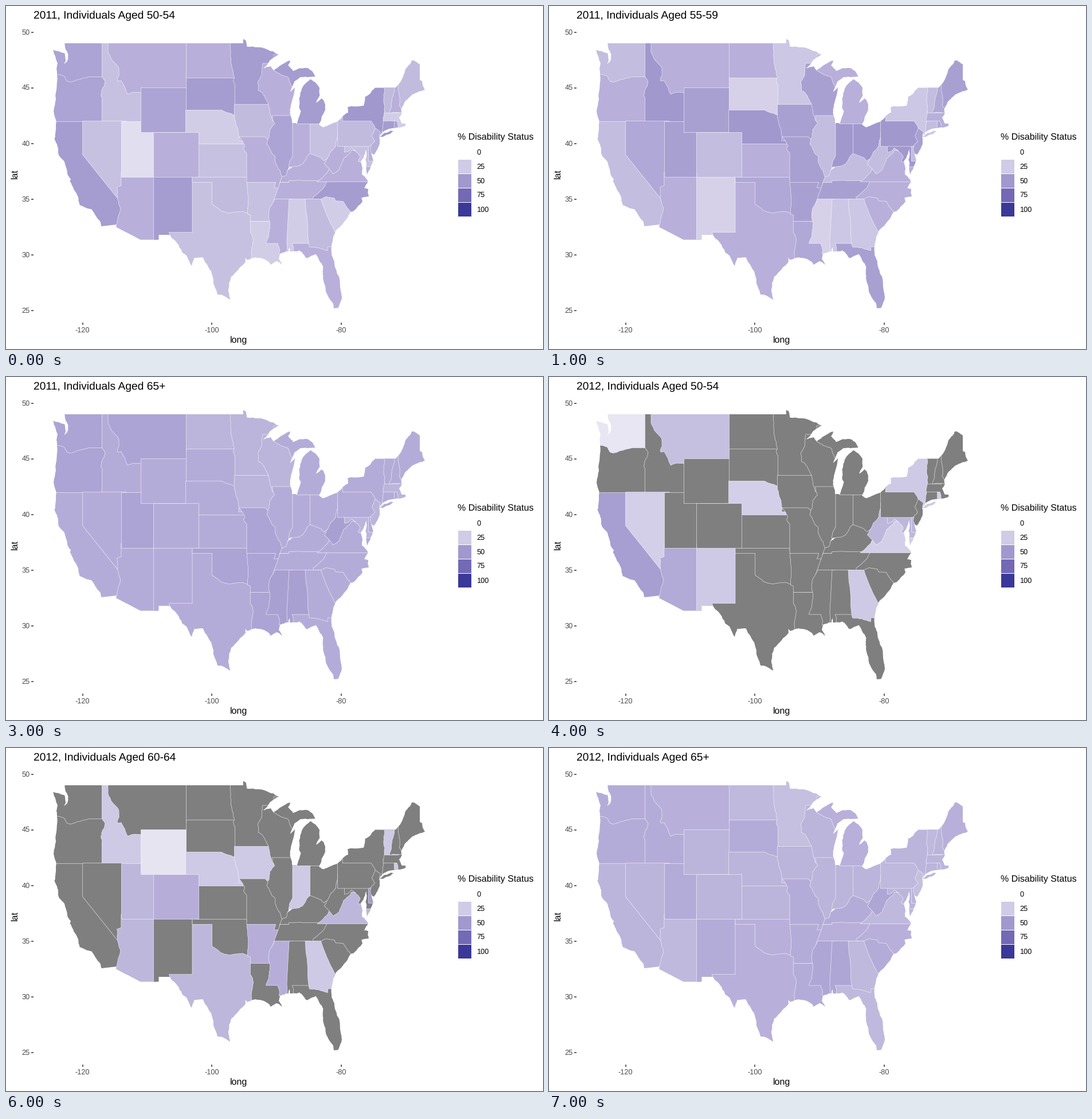
Write a matplotlib script that moves like this. It is 937 by 598 pixels and loops after 8000 ms.

```python
import numpy as np
import matplotlib.pyplot as plt
from matplotlib.animation import FuncAnimation
from matplotlib.patches import Polygon, Rectangle
from matplotlib.path import Path

W, H, DPI = 937, 598, 64
PT = 72 / DPI
rng = np.random.default_rng(4)

plt.rcParams["font.family"] = "Liberation Sans"
plt.rcParams["text.hinting"] = "none"
fig = plt.figure(figsize=(W / DPI, H / DPI), dpi=DPI, facecolor="white")
ax = fig.add_axes([0, 0, 1, 1])
ax.set(xlim=(0, W), ylim=(H, 0))
ax.axis("off")


def rough(*xy, k=0.05):
    """Line through the points; slanting parts get small seeded bends."""
    p = np.array(xy, float).reshape(-1, 2)
    for _ in range(3):
        d = np.diff(p, axis=0)
        bend = d[:, ::-1] * [1, -1] * rng.normal(0, k, (len(d), 1))
        bend[(d == 0).any(axis=1)] = 0
        p = np.insert(p, list(range(1, len(p))), p[:-1] + d / 2 + bend, axis=0)
    return p


def text(x, y, s, px, color="black", **kw):
    return ax.text(x, y, s, fontsize=px * PT, color=color, **kw)


def shade(value):
    """White to dark violet; grey where there is no value."""
    if np.isnan(value):
        return "#7f7f7f"
    ramp = [(255, 255, 255), (208, 203, 230), (161, 152, 206), (115, 105, 180), (58, 56, 152)]
    return [np.interp(value, [0, 25, 50, 75, 100], c) / 255 for c in zip(*ramp)]


# Outline, counter-clockwise from the north-west
pacific = rough(
    102.5, 65, 103, 72, 108.5, 84, 106.5, 97, 101, 101, 104, 94, 102.5, 82.5, 82, 76.5, 90, 100,
    89, 119, 87, 162, 83, 184, 87, 216, 84.5, 231, 91, 249, 92.5, 261, 105, 282, 113, 301.5,
    111.5, 305.5, 126, 333.5, 128.5, 347, 150, 355, 164, 375, 166.5, 384)
south_line = rough(193, 381, 192, 385, 234.5, 407.5, 266.5, 407.5, 266.5, 399, 286, 399, k=0)
rio = rough(286, 399, 302.5, 421, 324, 453, 328.5, 439, 343, 438, 351, 451, 369, 503, 391, 512)
gulf = rough(
    391, 512, 388, 494, 393, 472, 418, 446, 417.5, 439, 421, 443, 435.5, 438, 452, 442,
    461.5, 451, 472, 445, 482, 451, 476, 441, 478.5, 431.5, 493, 427.5, 494.5, 420, 496, 428,
    512, 426, 524.5, 439.5, 540.5, 432.5, 553.5, 455, 553, 474, 565.5, 512, 572, 527)
atlantic = rough(
    579, 526.5, 582.5, 519, 584, 496, 573, 449, 568, 420, 570, 408, 579, 388, 592.5, 373.5,
    601.5, 358.5, 606.5, 357.5, 622, 341, 620, 334, 633, 332, 632, 319, 625, 318, 631.5, 306.5,
    621, 294, 622, 283, 618.5, 271.5, 624, 263, 629, 249, 627.5, 268, 630, 294, 640.5, 269)
northeast = rough(
    635, 249, 642, 259, 652, 240, 652, 226, 664.5, 215.3, 681, 211.5, 697.5, 208.5, 695, 199.5,
    696.5, 205, 691, 205, 686, 195, 690.5, 188, 689.5, 179.5, 695, 168, 709.5, 154, 731, 146,
    726, 131, 722, 129, 722, 102, 708, 95, 697.5, 109.5, 685, 136.7)
lower_lakes = rough(
    680, 142.5, 644, 142.5, 626.5, 158, 624, 174, 596, 176.5, 597, 186, 579, 201, 554, 211.5,
    546, 206, 557, 181, 555, 166, 550.5, 161, 541, 168.5, 547.5, 156, 547, 142.5, 531, 127.6,
    516, 144.5, 511.5, 162, 514.5, 183, 508, 205, 499, 203.5, 495.5, 181, 504.4, 141, 495.5, 150)
upper_lakes = rough(
    503.5, 131, 513.5, 124, 539.5, 123, 534, 113.5, 528, 109, 501, 113.5, 492, 103, 496, 95,
    467, 112.4, 461.5, 105, 448, 108.6, 476, 84.5, 435.5, 72, 420, 70.5, 418.5, 60, 414, 57.5,
    413.6, 65)
mainland = np.vstack([pacific, south_line, rio, gulf, atlantic, northeast, lower_lakes, upper_lakes])
long_island = rough(652, 228, 671.5, 217.5, 676, 218.5, 657, 228)
land = Path.make_compound_path(*[
    Path(np.vstack([p, p[:1]]), closed=True) for p in (mainland, long_island)])

states = {}


def state(name, *xy, k=0.05):
    """Each state runs under the ones added after it, so a border is given once."""
    patch = Polygon(rough(*xy, *xy[:2], k=k), ec=(1, 1, 1, 0.8), lw=0.65 * PT,
                    joinstyle="round", zorder=1 + len(states) / 100)
    ax.add_patch(patch)
    patch.set_clip_path(land, ax.transData)
    states[name] = patch


def box(name, x0, y0, x1, y1):
    state(name, x0, y0, x1, y0, x1, y1, x0, y1)


# West
box("WA", 70, 55, 178, 135)
state("ID", 167.3, 55, 250, 55, 250, 210, 160, 210, 160, 125, 167.3, 125)
state("OR", 70, 119, 89, 119, 101, 122, 107, 131.5, 120, 130.5, 148, 123.5, 168, 123.5,
      173, 132, 165.5, 154, 167.3, 166, 167.3, 210, 70, 210)
state("MT", 178, 55, 320, 55, 320, 150, 234.5, 151, 212.5, 154, 201, 130, 195, 131,
      197, 109, 184, 93, 178, 80)
box("CA", 70, 200.7, 210, 400)
state("NV", 133.7, 200.7, 210, 200.7, 210, 325, 195.5, 336.5, 133.7, 259.3, k=0)
state("AZ", 200.9, 290, 265, 290, 265, 415, 180, 415, 193, 381, 199.5, 352, 194, 330,
      193.5, 316, 200.9, 313)
box("UT", 200.9, 200.7, 265, 297.7)
box("WY", 234.5, 142.3, 320, 220.1)
box("NM", 257, 290, 330, 415)

# Plains
box("ND", 313.5, 55, 402, 130)
box("SD", 313.5, 124.5, 402, 195)
state("NE", 313.5, 181.3, 376, 181.3, 398.5, 190, 420, 190, 420, 245, 313.5, 245)
state("TX", 325, 300, 445, 300, 445, 460, 400, 530, 260, 530, 260, 410, 286, 399,
      284.5, 394.7, 325, 394.7)
state("OK", 325, 290, 430, 290, 430, 362, 413, 358, 391, 361, 375, 357, 359.5, 345,
      359.5, 307.4, 325, 307.4)
box("KS", 330, 239.5, 425, 297.7)
box("CO", 257, 219.8, 336, 297.7)
state("MN", 390.5, 50, 391.7, 84, 398.5, 124.5, 396.5, 130, 399.5, 137, 399.5, 180, 480, 180, 480, 50)
state("AR", 420, 300, 490, 300, 490, 375.3, 426.3, 375.3, 426.3, 364.5, 421.5, 362.5, 422, 328.5)
state("LA", 426.3, 375.3, 500, 375.3, 500, 465, 428.5, 465, 428.5, 435, 431.5, 410, 426.3, 395)
state("IA", 398.5, 171.6, 480, 171.6, 480, 235, 406, 235, 405, 216, 398.5, 191)

# Lakes and rivers
state("WI", 448, 100, 520, 100, 520, 150, 500, 200, 464.5, 200, 458, 171.6, 450.5, 156,
      440.5, 147.5, 440, 131, 446, 121)
state("MO", 406.5, 228, 452, 228, 500, 260, 485, 307.4, 477.5, 307.4, 475, 317, 467.5, 317,
      470.5, 307.4, 420, 307.4, 420, 257, 414.5, 249, 416.5, 244.5)
state("KY", 478.5, 307.4, 481.5, 298, 520, 250, 566, 250, 566, 307.4)
state("TN", 478, 307.4, 493.5, 307.4, 493.5, 304.7, 570, 305.5, 570, 345, 465, 345, 475, 317, k=0.01)
state("IL", 464.5, 191, 510, 191, 510, 270, 494, 282, 488.5, 296, 481.5, 298, 469.5, 270.5,
      470, 263, 455, 240, 460, 216, 468.5, 205.5)
state("IN", 500, 190, 540, 190, 540, 250, 530.5, 257, 511, 279, 493.5, 282, 500, 262)
state("OH", 530.5, 190, 590, 190, 590, 240, 575, 244.5, 560, 266.5, 555, 270, 549.5, 264.5, 530.5, 257)
state("MI", 467, 112.4, 493, 125, 499, 141, 507, 138, 507, 205.3, 565, 205.3, 565, 85, 467, 85)

# South
state("MS", 468.5, 336.5, 500, 336.5, 500, 432, 476.5, 432, 474.5, 414, 453.5, 414, 460.5, 387, 459, 358)
state("AL", 494, 336.5, 530, 336.5, 530, 432, 491, 432, 490, 410, k=0)
state("FL", 500, 440, 501.5, 421, 499, 414, 575, 414, 600, 540, 530, 540)
box("SC", 540, 330, 620, 400)
state("GA", 522, 336.5, 549.5, 336.5, 556, 355, 574.5, 394.7, 590, 400, 575, 421, 562, 419.5,
      561.5, 426.5, 529.5, 420, 526, 377, k=0.02)
state("NC", 536, 336.5, 536, 333, 555, 316.5, 565.5, 300, 650, 300, 650, 370, 601, 358.5,
      588, 340.5, 575.5, 340, 573, 335, 558.5, 332.5, 549.5, 336.5, k=0.02)
state("VA", 543, 306.4, 562.5, 287, 590, 240, 650, 240, 650, 306.4)

# North-east
state("WV", 578.6, 220, 602.5, 220, 602.5, 247.5, 610, 253, 603, 251, 588.5, 266.5, 581, 286,
      571, 293, 555.5, 275, 560, 266.5, 575, 244.5, 578.6, 227)
state("MD", 590.5, 235, 645, 235, 645, 277.7, 626, 279, 614.5, 270.5, 618, 262, 610, 253,
      602.5, 247.5, 590.5, 255)
box("DE", 632, 235, 650, 269.5)
state("PA", 578.6, 180, 640, 180, 660, 230, 636.5, 243.5, 632, 244.9, 578.6, 244.9)
state("NJ", 644.3, 205, 656, 205, 656, 265, 641, 263, 635.5, 250, 636.5, 243.5, 643.5, 235.5,
      638.5, 226, 644.3, 213)
state("NY", 587.2, 130, 680, 130, 680, 232, 651.3, 230, 653.3, 220, 644.3, 213, 637, 200.7, 587.2, 200.7)
state("CT", 658, 195, 685, 195, 685, 215.5, 664, 217, 656, 220.5)
box("RI", 677.2, 195, 684, 215)
state("MA", 660.5, 180, 705, 180, 705, 217, 684, 217, 684, 206.5, 681.7, 200.3, 658, 200.3)
state("VT", 659.5, 135, 685, 135, 685, 186.5, 660.5, 186.5, 659, 162)
state("NH", 680.3, 135, 695, 135, 695, 183, 669, 186.7, 674, 160)
state("ME", 685, 85, 745, 85, 745, 180, 689.5, 179.5, 686.2, 173.5, 685, 136)


def levels(rest, groups):
    """One percentage for every state: those in a group, and the rest."""
    known = {name: v for v, names in groups.items() for name in names.split()}
    return np.array([known.get(name, rest) for name in states])


first_50 = levels(38, {
    16: "UT", 24: "NE LA AL SC MA", 30: "NV ID KS TX AR OH MD", 33: "OK IA GA PA VT ME",
    44: "WA OR WY IL RI", 48: "CA NM SD MN MI NC CT", 50: "NY"})
first_55 = levels(38, {
    22: "NM SD MS", 27: "MN AL GA NY", 32: "WA CA CO IL VT CT WV KY DE", 42: "NV OK LA NH RI",
    46: "WY UT IA MO AR WI TN FL ME NJ", 50: "ID NE IN OH PA MD"})
first_65 = levels(40, {
    36: "ND MN IA WI NJ MD MA", 44: "WA OR MT UT MO AR LA OK", 46: "MS AL WV"})
second_50 = levels(np.nan, {
    12: "WA", 23: "NV NE VA RI", 26: "NM GA NY", 31: "MT", 35: "WV MD DE", 41: "AZ", 47: "CA"})
second_55 = levels(np.nan, {25: "NE GA RI VT", 30: "NV UT IN VA MD", 40: "AZ DE"})
second_60 = levels(np.nan, {
    13: "WY", 26: "ID NE IA IN GA VT RI", 35: "UT AZ TX VA", 39: "CO AR MS", 48: "DE"})
second_65 = levels(36, {
    31: "MN NJ", 34: "AZ ND FL VA PA VT GA", 40: "WA OR UT ID NM SD MO AR LA KY SC",
    38: "OK TX TN MT NC ME MI", 43: "MS AL WV"})
series = [first_50, first_55, (first_55 + first_65) / 2, first_65,
          second_50, second_55, second_60, second_65]
ages = ["50-54", "55-59", "60-64", "65+"]

# Axes
tick = dict(color="#333333", lw=1.5 * PT, solid_capstyle="butt")
for lat in range(25, 51, 5):
    y = 1015.5 - 19.4 * lat
    ax.plot([44, 48.4], [y, y], **tick)
    text(42, y + 4.6, str(lat), 12.8, "#4d4d4d", ha="right")
for lon in (-120, -100, -80):
    x = 1486.5 + 11.275 * lon
    ax.plot([x, x], [551.5, 556], **tick)
    text(x, 569, str(lon), 12.8, "#4d4d4d", ha="center")
text(406, 587, "long", 16, ha="center")
text(19.8, 292.5, "lat", 16, rotation=90, rotation_mode="anchor", ha="center", va="baseline")

# Legend
text(787.5, 232.5, "% Disability Status", 16)
for i, value in enumerate(range(0, 101, 25)):
    y = 241.9 + 25.06 * i
    ax.add_patch(Rectangle((787.8, y), 24.6, 25.06, fc=shade(value), ec="white", lw=PT))
    text(821, y + 17.2, str(value), 12.8)

title = text(48.3, 22.5, "", 19.2)


def draw(i):
    title.set_text(f"{2011 + i // 4}, Individuals Aged {ages[i % 4]}")
    for patch, value in zip(states.values(), series[i]):
        patch.set_facecolor(shade(value))
    return [title, *states.values()]


anim = FuncAnimation(fig, draw, frames=8, interval=1000, repeat=True, repeat_delay=0)
plt.show()
```
